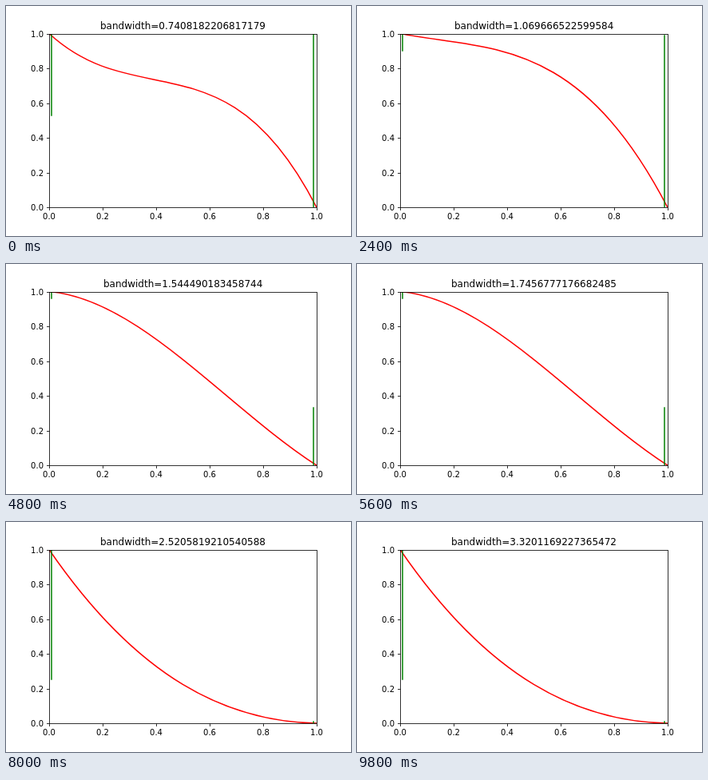
These frames come from a looping animation (432x288 px, 10 s). An HTML page with a canvas:

```html
<!DOCTYPE html>
<html lang="en">
<head>
<meta charset="utf-8">
<title>Bandwidth curve</title>
<style>
  html, body { margin: 0; width: 100%; height: 100%; overflow: hidden; background: #fff; }
  canvas { display: block; }
</style>
</head>
<body>
<canvas id="stage" width="432" height="288"></canvas>
<script>
const ctx = document.getElementById('stage').getContext('2d');
const STEPS = 50, STEP_MS = 200;
const LEFT = 54, RIGHT = 388.8, TOP = 34.56, BOTTOM = 252;
const FONT = '"DejaVu Sans", sans-serif';

// Inner control heights of the curve, held from the given step on.
const poses = [
  { from: 0, start: 0.53, end: 1 },
  { from: 3, start: 0.902, end: 0.988 },
  { from: 22, start: 0.96, end: 0.33 },
  { from: 29, start: 0.7, end: 0.005 },
  { from: 36, start: 0.253, end: 0.01 }
];

const toX = x => LEFT + x * (RIGHT - LEFT);
const toY = y => BOTTOM - y * (BOTTOM - TOP);
const snap = v => Math.round(v) + 0.5;

function line(x1, y1, x2, y2) {
  ctx.beginPath();
  ctx.moveTo(x1, y1);
  ctx.lineTo(x2, y2);
  ctx.stroke();
}

function drawCurve({ start, end }) {
  ctx.save();
  ctx.beginPath();
  ctx.rect(LEFT, 35, 335, 217);
  ctx.clip();
  ctx.lineWidth = 1.5;
  ctx.lineCap = 'square';
  ctx.strokeStyle = '#f00';
  ctx.beginPath();
  ctx.moveTo(toX(0), toY(1));
  ctx.bezierCurveTo(toX(1 / 3), toY(start), toX(2 / 3), toY(end), toX(1), toY(0));
  ctx.stroke();
  ctx.strokeStyle = '#008000';
  const bar = (x, y1, y2) =>
    line(Math.round(toX(x)), Math.round(toY(y1)), Math.round(toX(x)), Math.round(toY(y2)));
  bar(0.01, 1, start);
  bar(0.99, 0, end);
  ctx.restore();
}

function drawAxes() {
  ctx.strokeStyle = ctx.fillStyle = '#000';
  ctx.lineWidth = 0.8;
  ctx.lineCap = 'butt';
  ctx.strokeRect(54.5, 35.5, 335, 217);
  ctx.font = '10px ' + FONT;
  for (let i = 0; i <= 5; i++) {
    const label = (i / 5).toFixed(1);
    const x = snap(toX(i / 5)), y = snap(toY(i / 5));
    line(x, 252.5, x, 256);
    line(51, y, 54.5, y);
    ctx.textAlign = 'center';
    ctx.fillText(label, Math.round(toX(i / 5)), 267);
    ctx.textAlign = 'right';
    ctx.fillText(label, 47, Math.round(toY(i / 5)) + 4);
  }
}

function drawTitle(step) {
  const exponent = step < STEPS - 1 ? -0.3 + step * (1.5 / (STEPS - 1)) : 1.2;
  const title = 'bandwidth=' + Math.exp(exponent);
  ctx.font = '12px ' + FONT;
  ctx.textAlign = 'left';
  const width = ctx.measureText(title).width;
  ctx.fillText(title, Math.round((LEFT + RIGHT - width) / 2), 29);
}

function draw(now) {
  const step = Math.floor(now / STEP_MS) % STEPS;
  ctx.fillStyle = '#fff';
  ctx.fillRect(0, 0, 432, 288);
  drawCurve(poses.filter(pose => pose.from <= step).pop());
  drawAxes();
  drawTitle(step);
}

let origin;
function tick(now) {
  origin ??= now;
  draw(now - origin);
  requestAnimationFrame(tick);
}
draw(0);
requestAnimationFrame(tick);
</script>
</body>
</html>
```
